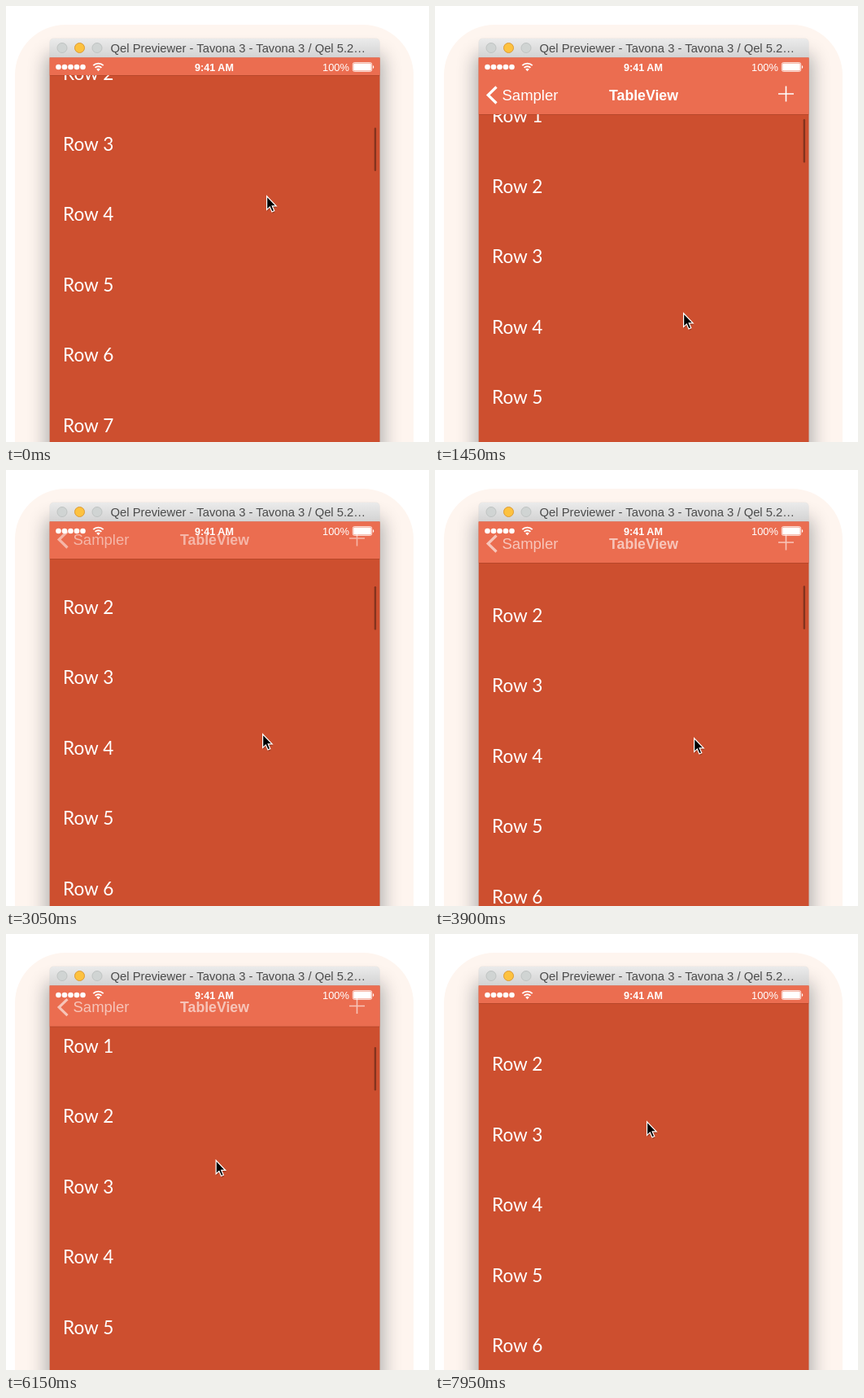
Recreate the animation shown at these times as an HTML page. Size 520 by 536 pixels, loop 8 s.

```html
<!DOCTYPE html>
<html lang="en">
<head>
<meta charset="utf-8">
<title>Scrolling navigation bar</title>
<style>
  html, body { margin: 0; width: 100%; height: 100%; overflow: hidden; background: #fff; }
  #stage { position: relative; width: 520px; height: 536px; overflow: hidden; }
  .glow { position: absolute; left: 11px; top: 23px; width: 490px; height: 700px; border-radius: 62px; background: #fef5ef; }
  .shadow { position: absolute; left: 54px; top: 40px; width: 405px; height: 700px; border-radius: 5px;
    box-shadow: 0 24px 22px 5px rgba(0, 24, 32, .31), 0 0 1px rgba(0, 0, 0, .3); }
  svg { position: absolute; left: 0; top: 0; }
  text { font-family: "Liberation Sans", Arial, sans-serif; fill: #fff; }
  #rows text { font: 22.6px Lato, sans-serif; }
  .line { fill: none; stroke: #fff; }
</style>
</head>
<body>
<div id="stage">
  <div class="glow"></div>
  <div class="shadow"></div>
  <svg width="520" height="536" viewBox="0 0 520 536">
    <defs>
      <linearGradient id="chrome" x2="0" y2="1">
        <stop offset="0" stop-color="#ebebeb"/>
        <stop offset="1" stop-color="#d2d2d2"/>
      </linearGradient>
      <clipPath id="screen"><rect x="53.7" y="63.5" width="405.8" height="473"/></clipPath>
    </defs>

    <path d="M53.7 64V45a5 5 0 0 1 5-5H454.5a5 5 0 0 1 5 5V64Z" fill="url(#chrome)"/>
    <g id="lights"></g>
    <text x="128.5" y="57" font-size="14.8" style="fill:#4b4b4b">Qel Previewer - Tavona 3 - Tavona 3 / Qel 5.2…</text>

    <g clip-path="url(#screen)">
      <rect x="53" y="63" width="407" height="473" fill="#cd4f2f"/>
      <g id="rows"></g>
      <rect id="thumb" x="452.7" width="2.4" height="53.5" rx="1.2" fill="#000" fill-opacity=".36"/>
      <g id="bar">
        <rect x="53" width="407" height="133" fill="#eb6d50"/>
        <rect x="53" y="133" width="407" height="1" fill="#000" fill-opacity=".1"/>
        <g id="buttons">
          <path class="line" stroke-width="3.2" d="M75.5 99.5L65.2 109.5L75.5 119.5"/>
          <text x="82.5" y="115.8" font-size="18.5">Sampler</text>
          <path class="line" stroke-width="1.6" d="M422 108H441M431.5 98.5V117.5"/>
        </g>
        <text id="title" x="256.5" y="115.8" font-size="17.7" font-weight="bold" text-anchor="middle">TableView</text>
      </g>

      <g id="dots" fill="#fff"></g>
      <path class="line" stroke-width="1.9" d="M107.3 73.2a8.8 8.8 0 0 1 12.4 0M109.6 75.9a5.6 5.6 0 0 1 7.8 0"/>
      <path fill="#fff" d="M113.5 80.3L111.2 77.8a3.3 3.3 0 0 1 4.6 0Z"/>
      <text x="256" y="79.5" font-size="12.6" font-weight="bold" text-anchor="middle">9:41 AM</text>
      <text x="389" y="79.5" font-size="12.9">100%</text>
      <rect class="line" x="426.3" y="69.6" width="23.4" height="10.8" rx="2" stroke-width=".8"/>
      <rect x="427.2" y="70.5" width="21.6" height="9" rx="1.2" fill="#fff"/>
      <path fill="#fff" d="M451 73a2.2 2.2 0 0 1 0 4Z"/>
    </g>

    <g id="pointer">
      <path d="M1 2V19.5L5 16L7.7 22L10.6 20.8L8 15H13.3Z" opacity=".2"/>
      <path d="M.6 .8V17.4L4.4 13.9L7 19.9L9.8 18.7L7.2 12.9H12.2Z" stroke="#fff" stroke-width="1.2"/>
    </g>
  </svg>
</div>
<script>
  const LOOP = 8000, STEP = 50, ROW_GAP = 86.5, BAR_MIN = 85, BAR_MAX = 133, TOP_ROW = 263;
  const TAP = 5150, OPENED = 5450;

  const el = id => document.getElementById(id);
  const clamp = (v, low = 0, high = 1) => Math.max(low, Math.min(high, v));
  const ramp = (t, from, to) => clamp((t - from) / (to - from));
  const ease = u => u * u * (3 - 2 * u);
  const mix = (a, b, u) => a + (b - a) * u;
  const place = (node, x, y) => node.setAttribute("transform", `translate(${x} ${y})`);

  // Each action changes bar and row from the eased progress and the pointer's travel.
  const hover = () => {};

  // A dragged finger moves the bar until it reaches a limit; the rows follow both.
  const drag = (s, dy) => {
    const bar = clamp(s.bar + dy, BAR_MIN, BAR_MAX);
    s.row += dy + bar - s.bar;
    s.bar = bar;
  };

  const scrollToTop = (s, dy, u) => {
    s.bar = mix(s.bar, BAR_MAX, u);
    s.row = mix(s.row, TOP_ROW, u ** 1.5);
  };

  const hideBar = (s, dy, u) => {
    s.bar = mix(s.bar, BAR_MIN, u);
    s.row -= 4 * u;
  };

  // action, end time, pointer x, pointer y
  const gestures = [
    [drag, 900, 312, 323.5],
    [hover, 1300, 305, 377],
    [hover, 1450, 305, 377],
    [drag, 1950, 310, 324],
    [hover, 2250, 313, 300],
    [drag, 3050, 315, 324],
    [drag, 3450, 317, 336],
    [drag, 3900, 318, 329],
    [drag, 4300, 319, 292],
    [hover, 5050, 275, 74],
    [hover, TAP, 275, 74],
    [scrollToTop, OPENED, 275, 74],
    [hover, 6000, 258, 297],
    [drag, 6500, 256, 207],
    [drag, 6900, 257, 226.5],
    [hideBar, 7200, 258, 230],
    [hover, LOOP, 260, 230]
  ];

  function pose(t) {
    const s = { x: 320, y: 233, bar: BAR_MIN, row: 83 };
    let begin = 0;
    for (const [act, end, x, y] of gestures) {
      if (t < begin) break;
      const u = ease(ramp(t, begin, end));
      const dy = (y - s.y) * u;
      act(s, dy, u);
      s.x = mix(s.x, x, u);
      s.y += dy;
      begin = end;
    }
    return s;
  }

  function add(parent, name, attrs, label = "") {
    const node = document.createElementNS(parent.namespaceURI, name);
    for (const key in attrs) node.setAttribute(key, attrs[key]);
    node.textContent = label;
    parent.appendChild(node);
  }

  for (let n = 1; n <= 8; n++) add(el("rows"), "text", { x: 70, y: (n - 2) * ROW_GAP + 8 }, "Row " + n);
  for (let i = 0; i < 5; i++) add(el("dots"), "circle", { cx: 64.5 + 7.5 * i, cy: 75, r: 3.3 });
  for (let i = 0; i < 3; i++) {
    const [fill, stroke] = i === 1 ? ["#fdc23f", "#dd9a35"] : ["#d0d4d3", "#bfc3c2"];
    add(el("lights"), "circle", { cx: 69 + 21.5 * i, cy: 51.5, r: 6, fill, stroke });
  }

  function draw(t) {
    const { x, y, bar, row } = pose(t);
    const shown = ramp(bar, BAR_MIN, BAR_MAX);
    const opening = t >= TAP && t < OPENED;
    place(el("pointer"), x, y);
    place(el("rows"), 0, row);
    place(el("bar"), 0, bar - BAR_MAX);
    el("buttons").setAttribute("opacity", shown);
    el("title").setAttribute("opacity", opening ? 1 : shown);

    const base = opening ? bar : BAR_MAX + 3;
    const fade = t < TAP ? 1 - ramp(t, 4700, 5000) : ramp(t, TAP, TAP + STEP) - ramp(t, 7500, 7800);
    el("thumb").setAttribute("y", base + 0.075 * (TOP_ROW - row));
    el("thumb").setAttribute("opacity", fade);
  }

  const start = performance.now();
  function tick() {
    const t = (performance.now() - start) % LOOP;
    draw(Math.floor(t / STEP) * STEP);
    requestAnimationFrame(tick);
  }
  tick();
</script>
</body>
</html>
```
